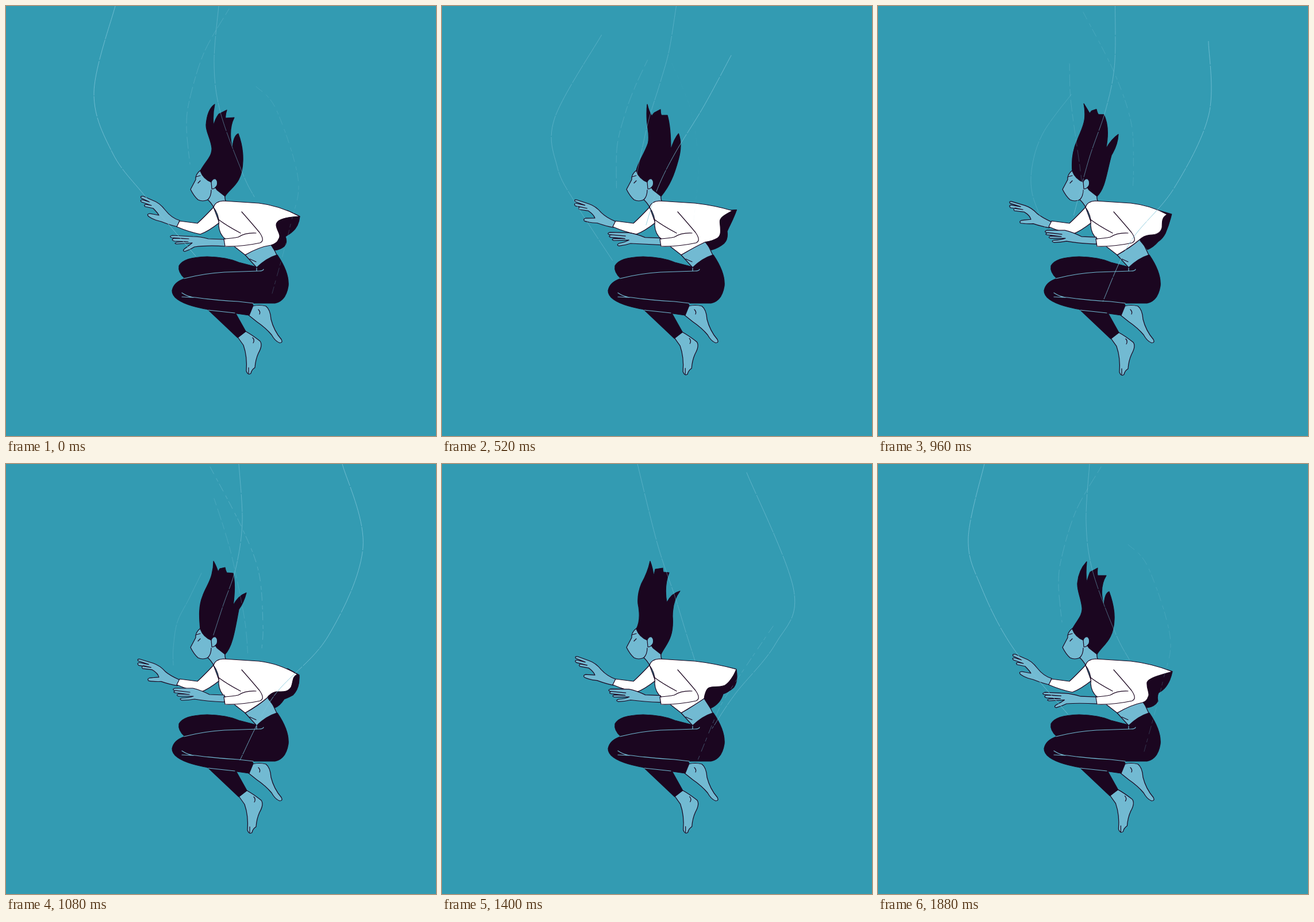
Animation, 748 px wide and 748 px high, one loop 1.92 s. Source, as an HTML page:

```html
<!DOCTYPE html>
<html lang="en">
<head>
<meta charset="utf-8">
<title>Falling</title>
<style>
html, body { margin: 0; width: 100%; height: 100%; overflow: hidden; background: #339bb2; }
svg { display: block; width: 100vw; height: 100vh; }
path { stroke: #1b0620; stroke-width: 1.2; stroke-linejoin: round; stroke-linecap: round; fill: none; }
.skin { fill: #72bad2; }
.dark { fill: #1b0620; }
.white { fill: #fff; }
.seam { stroke: #72bad2; }
#strands path { stroke: #7cc4d8; stroke-width: 1; }
</style>
</head>
<body>
<svg viewBox="0 0 748 748">
  <g id="feet">
    <path class="skin" d="M417 566Q428 572 442 583Q447 590 439 604Q434 615 433 629Q427 633 426 639Q421 643 418 635Q420 610 413 590L403 576Z"/>
    <path d="M429 577Q433 581 430 586M422 629L422 639"/>
    <path class="dark" d="M348 525L403 577L417 566L398 532Z"/>
  </g>
  <path class="skin" d="M429 522Q440 519 452 522Q460 528 461 545Q466 565 479 580Q482 586 476 586Q468 583 462 572Q452 560 436 549L421 537Z"/>
  <path d="M439 528Q443 532 441 536"/>
  <path class="dark" d="M311 474Q299 463 301 452Q308 437 350 436Q385 437 405 446L436 454V462Q350 464 311 474Z"/>
  <path class="dark" d="M436 455Q452 438 472 433Q493 464 491 487Q487 513 468 517L428 517L430 521L423 538L352 528Q289 517 289 495Q292 480 311 474Q345 463 436 461Z"/>
  <path class="seam" d="M310 474Q345 465 380 463L440 461Q447 461 448 458M436 455V461M306 499Q318 507 330 507Q365 512 404 514L430 517M306 506L326 507M352 529Q370 531 398 534"/>
  <path class="skin" d="M416 433Q440 420 457 404L471 433Q452 439 436 455Z"/>
  <path d="M424 440L435 445"/>
  <path id="back" class="dark"/>

  <path id="handA" class="skin"/>
  <path class="white" d="M302 374L333 378Q345 367 361 350L371 377Q352 392 338 397Q318 393 297 384Z"/>
  <path class="skin" d="M338 286Q329 293 330 302L321 319Q327 331 334 337Q342 341 351 337Q357 342 361 350L384 342Q380 338 381 328L366 318L360 306Z"/>
  <path d="M351 337Q357 331 357 320M334 308L338 304M331 297L338 295"/>
  <path id="shirt" class="white"/>
  <path id="hair" class="dark"/>
  <path class="skin" d="M357 306Q360 299 365 301Q369 305 367 312Q363 319 358 318Z"/>
  <path id="handB" class="skin"/>
  <path class="white" d="M410 358Q432 383 441 394Q451 408 442 412Q410 419 381 419L379 406Q395 404 408 401Z" stroke="none" style="stroke:none"/>
  <path d="M410 358Q432 383 441 394Q451 408 442 412Q410 419 381 418L379 405Q395 404 404 402Q416 394 435 395M369 371Q385 383 408 395"/>
  <g id="strands"></g>
</svg>
<script>
const LOOP = 1920, STEP = 40;
const NUMBER = /-?\d*\.?\d+/g;
const $ = id => document.getElementById(id);
const poses = [];
const pose = (t, parts) => poses.push({ t, ...parts });

// Strands hold an opacity followed by five points.
pose(0, {
  hair: "C347 270 359 262 358 247C356 230 348 220 348 207Q350 180 363 171Q359 190 361 208Q364 196 370 188L384 181Q381 190 382 195L397 194Q386 215 394 249Q395 226 404 222Q413 246 412 270C411 310 391 315",
  hem: "511 366C490 367 470 370 470 381C471 392 480 398 474 406Q472 413 461 416",
  back: "511 366C509 385 500 393 486 401Q490 412 484 418Q477 424 467 425",
  a: 0, b: 0,
  s0: ".8 190 0 153 150 185 255 243 332 330 435",
  s1: ".5 370 0 362 100 373 185 412 292 432 332",
  s2: "0 420 8 380 90 350 165 335 215 325 250",
  s3: ".25 435 140 470 180 508 300 495 380 463 500",
  s4: ".35 388 5 345 80 320 160 314 210 320 275"
});
pose(280, {
  hair: "C343 277 361 257 362 240C362 225 352 213 351 198Q351 179 361 171Q360 188 363 198Q365 192 368 188L382 181Q380 188 381 192L395 193Q386 212 397 248Q399 225 405 222Q415 237 415 262C412 295 395 310",
  hem: "513 355C500 362 478 365 476 374C474 385 484 395 481 405Q476 416 461 414",
  back: "513 355C512 380 500 392 490 401Q492 412 487 416Q480 423 467 426",
  a: .25, b: .25,
  s0: ".6 225 8 152 200 180 290 235 352 303 440",
  s1: ".35 390 0 378 45 371 80 368 105 367 127",
  s2: ".7 448 8 410 90 372 165 355 215 345 250",
  s3: ".1 440 180 455 240 450 290 453 307 430 480",
  s4: ".4 430 20 412 75 390 130 365 200 352 290"
});
pose(760, {
  hair: "C337 268 345 255 355 237C361 225 363 215 362 202Q360 186 353 171Q360 180 367 185Q369 184 371 183L378 179Q380 185 382 188L389 187Q410 208 399 252Q409 236 418 222Q422 245 408 270C396 293 398 315",
  hem: "497 357C486 365 486 370 491 380C495 392 489 402 478 402Q465 402 455 407",
  back: "512 354C500 366 500 372 502 383Q504 400 494 410Q482 419 470 423",
  a: 1, b: .95,
  s0: ".4 330 93 240 190 221 270 230 335 290 445",
  s1: ".6 425 0 412 110 388 187 349 300 308 470",
  s2: ".8 558 164 500 260 440 345 395 420 365 512",
  s3: "0 360 20 410 120 440 220 440 270 440 320",
  s4: ".3 285 168 258 210 247 245 244 290 255 350"
});
pose(1080, {
  hair: "C336 267 335 247 342 230C346 217 355 206 358 192Q361 180 361 169Q367 180 369 188Q370 185 372 182L381 180Q382 186 384 189L395 190Q400 212 395 246Q404 229 418 224Q414 240 405 253C398 290 394 318",
  hem: "507 366C497 370 500 380 496 388C490 398 480 396 470 396Q460 398 454 407",
  back: "510 367C511 385 506 395 499 402Q490 407 484 409Q476 421 468 424",
  a: .85, b: 1,
  s0: ".3 340 190 318 235 298 275 291 320 291 350",
  s1: ".6 405 0 411 100 400 180 378 245 360 300",
  s2: ".8 585 0 621 145 560 300 465 405 407 515",
  s3: ".45 355 5 410 110 440 190 447 280 445 320",
  s4: ".3 362 60 380 115 395 170 415 270 421 335"
});
pose(1400, {
  hair: "C345 274 344 258 341 243C340 230 342 220 347 208Q358 188 362 169Q367 182 368 195Q370 188 371 183L384 181Q384 185 385 188L395 189Q386 212 391 241Q399 225 414 221Q401 238 401 265C404 305 388 315",
  hem: "512 357C508 368 500 380 492 385C480 390 470 385 463 390Q458 395 456 408",
  back: "512 358C514 370 513 382 507 389Q498 397 489 400Q484 417 467 425",
  a: .4, b: .85,
  s0: "0 200 0 170 130 190 220 245 320 320 430",
  s1: ".5 340 0 375 140 405 230 425 295 440 342",
  s2: ".6 530 15 612 220 580 313 510 400 470 460",
  s3: ".4 576 282 530 350 500 395 480 430 445 515",
  s4: "0 362 60 380 115 395 170 415 270 421 335"
});
pose(1560, {
  hair: "C346 277 351 267 349 255C346 244 341 234 342 215Q346 195 362 170Q365 187 366 203Q369 192 371 187L383 181Q383 186 384 190L395 190Q384 215 391 245Q392 226 405 222Q402 240 405 268C406 305 388 315",
  hem: "513 352C511 368 500 378 485 380C470 381 463 385 463 395Q463 404 455 412",
  back: "513 352C517 370 513 390 500 397Q487 401 486 407Q484 420 468 424",
  a: .1, b: .65,
  s0: "0 200 0 170 130 190 220 245 320 320 430",
  s1: ".5 343 0 358 90 380 170 410 250 442 342",
  s2: ".5 508 35 580 165 597 235 560 340 480 460",
  s3: ".4 567 212 571 245 555 320 520 370 455 510",
  s4: "0 388 5 345 80 320 160 314 210 320 275"
});
pose(1880, {
  hair: "C346 272 356 264 355 250C353 232 346 220 347 207Q349 185 363 170Q361 190 363 206Q366 195 369 188L382 181Q381 189 382 194L397 194Q384 215 393 247Q394 225 402 222Q412 250 411 270C410 308 390 315",
  hem: "512 361C495 366 470 372 468 380C467 392 474 400 470 405Q468 413 460 415",
  back: "512 361C508 380 500 392 488 398Q485 404 487 413Q480 423 468 424",
  a: 0, b: .2,
  s0: ".8 185 0 157 130 180 215 235 320 330 435",
  s1: ".5 368 0 362 100 373 185 412 292 437 340",
  s2: "0 480 60 560 170 570 235 540 340 470 460",
  s3: ".25 435 140 470 180 508 300 495 380 463 500",
  s4: ".35 388 5 345 80 320 160 314 210 320 275"
});
poses.push({ ...poses[0], t: LOOP });

const raisedA = "M302 373Q288 369 277 355Q267 342 255 338L239 331Q233 330 235 334L250 341L237 337Q232 338 236 341L253 347L243 345Q239 346 242 349L256 352Q264 360 266 364L250 361Q244 362 248 366Q258 373 270 375Q285 381 298 384Z";
const loweredA = "M302 376Q285 368 277 362Q268 352 256 348L232 341Q227 340 229 344L248 350L231 347Q226 348 230 352L252 355L238 352Q234 354 237 357L254 359Q264 364 266 372L250 374Q245 376 248 379Q258 380 270 379Q285 384 298 386Z";
const loweredB = "M380 406L352 405Q338 401 325 401L289 399Q283 401 288 403L318 405L292 404Q286 407 293 409L317 410L297 411Q291 413 297 414L324 412Q318 417 311 422Q306 426 311 427Q320 424 328 419Q350 416 382 418Z";
const raisedB = "M380 402L354 401Q338 393 325 390L294 390Q288 392 293 394L320 397L295 394Q289 397 295 398L319 401L300 400Q295 402 300 404L326 404Q318 407 306 407Q300 409 306 411Q318 411 328 409Q350 413 380 414Z";

const lerp = (a, b, k) => a + (b - a) * k;

// Blends two strings that differ only in their numbers.
function mix(a, b, k) {
  const ends = b.match(NUMBER);
  let i = 0;
  return a.replace(NUMBER, v => lerp(+v, +ends[i++], k).toFixed(2));
}

// Smooth curve through a flat list of coordinates.
function curve(c) {
  const at = i => {
    const j = 2 * Math.max(0, Math.min(c.length / 2 - 1, i));
    return [c[j], c[j + 1]];
  };
  let d = "M" + at(0);
  for (let i = 0; i < c.length / 2 - 1; i++) {
    const [p, q, r, s] = [-1, 0, 1, 2].map(n => at(i + n));
    const near = q.map((v, n) => v + (r[n] - p[n]) / 6);
    const far = r.map((v, n) => v - (s[n] - q[n]) / 6);
    d += `C${near} ${far} ${r}`;
  }
  return d;
}

const dashes = ["60 2 35 3", "50 3 30 2", "40 3 70 2", "14 9 6 5", "12 7 20 5"];
const strands = dashes.map(dash => {
  const path = document.createElementNS("http://www.w3.org/2000/svg", "path");
  path.setAttribute("stroke-dasharray", dash);
  return $("strands").appendChild(path);
});
const shape = (id, d) => $(id).setAttribute("d", d);

function draw(t) {
  const i = poses.findIndex(p => p.t > t);
  const from = poses[i - 1], to = poses[i];
  const k = (t - from.t) / (to.t - from.t);
  const part = name => mix(from[name], to[name], k);
  const a = lerp(from.a, to.a, k), b = lerp(from.b, to.b, k);

  shape("hair", `M338 287${part("hair")} 381 331L367 320L358 307Q343 301 338 287Z`);
  shape("shirt", `M361 350Q364 340 378 339L440 343Q475 347 ${part("hem")}Q440 419 416 433L398 419L382 406Q371 397 370 382Q372 365 361 350Z`);
  shape("back", `M${part("back")}L456 408L460 360L490 356Z`);
  shape("handA", mix(raisedA, loweredA, a));
  shape("handB", mix(loweredB, raisedB, b));
  $("feet").setAttribute("transform", `translate(${2 * b} ${2 * b})`);
  strands.forEach((path, n) => {
    const [opacity, ...points] = part("s" + n).split(" ").map(Number);
    path.setAttribute("d", curve(points));
    path.setAttribute("opacity", opacity);
  });
}

function tick() {
  draw(Math.floor(performance.now() % LOOP / STEP) * STEP);
  requestAnimationFrame(tick);
}
tick();
</script>
</body>
</html>
```
